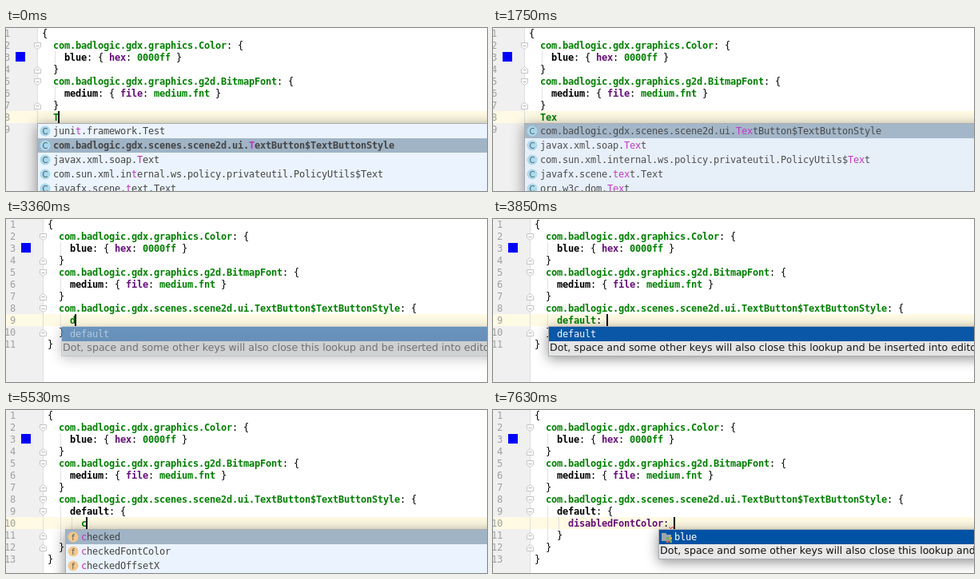
An HTML page with a canvas for the animation above (8 s loop, 602 by 204 pixels).

```html
<!DOCTYPE html>
<html>
<head>
<meta charset="utf-8">
<style>
html, body { margin: 0; width: 100%; height: 100%; overflow: hidden; background: #fff; }
canvas { display: block; }
</style>
</head>
<body>
<canvas id="stage" width="602" height="204"></canvas>
<script>
const ctx = document.getElementById('stage').getContext('2d');
const W = 602, H = 204, LOOP = 8000, CELL = 7, LINE = 15, ITEM = 18;
const MONO = '12px "DejaVu Sans Mono", monospace';
const SANS = '12.6px "DejaVu Sans", sans-serif';
const HINT = 'Dot, space and some other keys will also close this lookup and be inserted into editor';

// Code lines: parts split by "|", each led by a style letter.
const STYLES = { k: ['#000', ''], b: ['#000', 'bold '], g: ['#008000', 'bold '], p: ['#660e7a', 'bold '] };
const STYLE_CLASS = 'com.badlogic.gdx.scenes.scene2d.ui.TextButton$TextButtonStyle';
const HEAD = [
  'k{',
  'k  |gcom.badlogic.gdx.graphics.Color|k: {',
  'k    |bblue|k: { |phex|k: |g0000ff|k }',
  'k  }',
  'k  |gcom.badlogic.gdx.graphics.g2d.BitmapFont|k: {',
  'k    |bmedium|k: { |pfile|k: |gmedium.fnt|k }',
  'k  }'
];
const typed = word => ['g  ' + word, 'k}'];
const named = tail => ['k  |g' + STYLE_CLASS + '|k' + tail, 'k}'];
const inClass = line => ['k  |g' + STYLE_CLASS + '|k: {', line, 'k  }', 'k}'];
const inDefault = line => ['k  |g' + STYLE_CLASS + '|k: {', 'k    |bdefault|k: {', line, 'k    }', 'k  }', 'k}'];

const [TEST, SOAP, POLICY, JAVAFX, DOM] = ['junit.framework.Test', 'javax.xml.soap.Text',
  'com.sun.xml.internal.ws.policy.privateutil.PolicyUtils$Text', 'javafx.scene.text.Text', 'org.w3c.dom.Text'];
const classes = (prefix, items, sel = 0) => ({ x: 59, row: 8, icon: 'C', prefix, items, sel });
const fields = (prefix, ...items) => ({ x: 94, row: 10, icon: 'f', prefix, items, sel: 0 });
const texList = classes('Tex', [STYLE_CLASS, SOAP, POLICY, JAVAFX, DOM]);
const defaultList = { x: 80, row: 9, items: ['default'], hint: true };
const blueList = { x: 227, row: 10, icon: 'folder', items: ['blue'], hint: true };

// Each step changes part of the state from its time on.
const STEPS = [
  [0, { lines: typed('T'), caret: [8, 3], folds: [], wide: false, wave: null, alpha: 1,
        popup: { ...classes('T', [TEST, STYLE_CLASS, SOAP, POLICY, JAVAFX], 1), bold: true } }],
  [210, { lines: typed('Te'), caret: [8, 4], popup: classes('Te', [STYLE_CLASS, TEST, SOAP, POLICY, JAVAFX]) }],
  [630, { lines: typed('Tex'), caret: [8, 5], alpha: .6 }],
  [700, { popup: texList, alpha: .8 }],
  [770, { alpha: 1 }],
  [1540, { caret: null }],
  [1750, { alpha: .94 }],
  [1820, { lines: named(''), caret: [8, 63], popup: null }],
  [2100, { lines: named(': '), caret: null, folds: [8, -9] }],
  [2310, { lines: named(': {}'), caret: [8, 66] }],
  [2660, { lines: inClass('k'), caret: [9, 0], folds: [] }],
  [2730, { caret: [9, 4] }],
  [2870, { wide: true }],
  [3150, { folds: [8, -10] }],
  [3360, { lines: inClass('g    d'), caret: [9, 5], popup: defaultList, alpha: .5 }],
  [3430, { alpha: 1 }],
  [3850, { lines: inClass('k    |gdefault|k: '), caret: [9, 13], alpha: .96 }],
  [3920, { popup: null }],
  [4200, { lines: inClass('k    |bdefault|k: ') }],
  [4270, { wave: [9, 12] }],
  [4410, { lines: inClass('k    |bdefault|k: {}'), caret: [9, 14] }],
  [4760, { wave: null }],
  [4970, { lines: inDefault('k'), caret: [10, 6], folds: [8, -12] }],
  [5320, { folds: [8, 9, -11, -12] }],
  [5460, { lines: inDefault('g      c'), caret: [10, 7], alpha: .5,
           popup: fields('c', 'checked', 'checkedFontColor', 'checkedOffsetX') }],
  [5530, { alpha: 1 }],
  [6020, { lines: inDefault('g      co'), caret: [10, 8],
           popup: fields('co', 'checkedOffsetX', 'checkedOffsetY', 'checkedOver') }],
  [6510, { lines: inDefault('g      col'), caret: [10, 9],
           popup: fields('col', 'disabledFontColor', 'checkedFontColor', 'checkedOverFontColor') }],
  [7070, { lines: inDefault('k      |gdisabledFontColor|k: '), caret: [10, 25], popup: null }],
  [7350, { lines: inDefault('k      |pdisabledFontColor|k: '), wave: [10, 24] }],
  [7560, { popup: blueList, alpha: .5 }],
  [7630, { alpha: 1 }]
];

const rowTop = row => (row - 1) * LINE - 1;

function box(x, y, w, h, color) {
  ctx.fillStyle = color;
  ctx.fillRect(x, y, w, h);
}

// Draws text on the fixed character grid; color may depend on the index.
function grid(text, x, y, color, weight = '') {
  ctx.font = weight + MONO;
  [...text].forEach((ch, i) => {
    ctx.fillStyle = typeof color === 'function' ? color(i) : color;
    ctx.fillText(ch, x + i * CELL, y);
  });
}

function path(points, color, fill) {
  ctx.beginPath();
  points.forEach(([x, y]) => ctx.lineTo(x, y));
  if (fill) {
    ctx.closePath();
    ctx.fillStyle = fill;
    ctx.fill();
  }
  ctx.strokeStyle = color;
  ctx.lineWidth = 1;
  ctx.stroke();
}

function foldMark(x, row) {
  const mid = rowTop(Math.abs(row)) + 8.5, d = Math.sign(row) * 4;
  path([[x - 4, mid - d], [x + 4, mid - d], [x + 4, mid + d / 4], [x, mid + d], [x - 4, mid + d / 4]], '#c4c4c4', '#fff');
  path([[x - 2, mid], [x + 2, mid]], '#b0b0b0');
}

function editor(s) {
  const shift = s.wide ? CELL : 0, left = 45 + shift;
  const lines = HEAD.concat(s.lines);
  const current = s.caret ? s.caret[0] : 8;
  box(0, 0, W, H, '#fff');
  box(0, 0, 40 + shift, H, '#f0f0f0');
  box(0, rowTop(current), W, LINE, '#fffae3');
  box(39 + shift, 0, 1, H, '#dedede');
  box(12 + shift, 30, 12, 12, '#0000ff');

  const inner = lines.length > 9 ? lines.length - 10 : 0;
  [[3, 1], [6, 1], [9, inner]].forEach(([row, n]) => box(left + 16, rowTop(row), 1, n * LINE, '#e2e2e2'));
  if (lines.length === 13) box(left + 30, rowTop(10), 1, LINE, '#e2e2e2');

  lines.forEach((line, i) => {
    const base = rowTop(i + 1) + 12, num = String(i + 1);
    grid(num, 5 + shift - CELL * num.length, base, '#a0a0a0');
    let x = left;
    for (const part of line.split('|')) {
      const text = part.slice(1);
      grid(text, x, base, ...STYLES[part[0]]);
      x += text.length * CELL;
    }
  });

  [2, -4, 5, -7, ...s.folds].forEach(row => foldMark(39.5 + shift, row));
  if (s.wave) {
    const x = left + s.wave[1] * CELL, y = rowTop(s.wave[0]) + 12.5;
    path([0, 1, 2, 3].map(i => [x + i * 2 + .5, y + (i % 2) * 2]), '#f00');
  }
  if (s.caret) box(left + s.caret[1] * CELL - 1, rowTop(s.caret[0]), 2, LINE, '#000');
}

// Indices of the letters that match the typed prefix.
function matches(text, prefix = '') {
  const low = text.toLowerCase(), key = prefix.toLowerCase();
  let at = low.indexOf(key) - 1;
  if (at < -1) at = -1;
  return [...key].map(ch => at = low.indexOf(ch, at + 1));
}

function itemIcon(kind, x, y) {
  if (kind === 'folder') {
    box(x - 6, y - 5, 6, 3, '#9aa7b0');
    box(x - 6, y - 3, 12, 8, '#9aa7b0');
    box(x, y, 3, 3, '#62b543');
    box(x + 4, y, 3, 3, '#e0a050');
    box(x, y + 4, 3, 3, '#d66');
    box(x + 4, y + 4, 3, 3, '#62b543');
    return;
  }
  ctx.beginPath();
  ctx.arc(x, y, 6.5, 0, 7);
  ctx.fillStyle = kind === 'C' ? '#a9d9ec' : '#f4c88b';
  ctx.fill();
  ctx.font = '10px "DejaVu Sans", sans-serif';
  ctx.textAlign = 'center';
  ctx.fillStyle = '#4b5c66';
  ctx.fillText(kind, x, y + 3.5);
  ctx.textAlign = 'left';
}

function lookup(p, alpha) {
  const left = p.x - (p.icon ? 20 : 11), top = rowTop(p.row + 1);
  const height = (p.hint ? 2 : 11) * ITEM + 2;
  ctx.globalAlpha = alpha;
  ctx.shadowColor = 'rgba(0,0,0,.45)';
  ctx.shadowBlur = 16;
  ctx.shadowOffsetY = 3;
  box(left, top, 800, height, '#a8adb2');
  ctx.shadowColor = 'transparent';
  box(left + 1, top + 1, 800, height - 2, p.hint ? '#e8e8e8' : '#ebf4fe');
  p.items.forEach((text, i) => {
    const y = top + 1 + i * ITEM, selected = i === p.sel;
    if (p.hint) box(left + 1, y, W, ITEM, '#0052a4');
    else if (selected) box(left + 1, y, W, ITEM, '#a0b4c6');
    if (p.icon) itemIcon(p.icon, left + 10, y + 9);
    const hits = matches(text, p.prefix), plain = p.hint ? '#fff' : '#444';
    grid(text, p.x, y + 13, n => hits.includes(n) ? '#c22fc2' : plain, selected && p.bold ? 'bold ' : '');
  });
  if (p.hint) {
    ctx.font = SANS;
    ctx.textRendering = 'geometricPrecision';
    ctx.fillStyle = '#111';
    ctx.fillText(HINT, left + 2, top + ITEM + 13);
    ctx.textRendering = 'auto';
  }
  ctx.globalAlpha = 1;
}

function draw(now) {
  const t = now % LOOP;
  const s = Object.assign({}, ...STEPS.filter(([at]) => at <= t).map(([, change]) => change));
  editor(s);
  if (s.popup) lookup(s.popup, s.alpha);
}

const start = performance.now();
function tick() {
  draw(performance.now() - start);
  requestAnimationFrame(tick);
}
tick();
</script>
</body>
</html>
```
